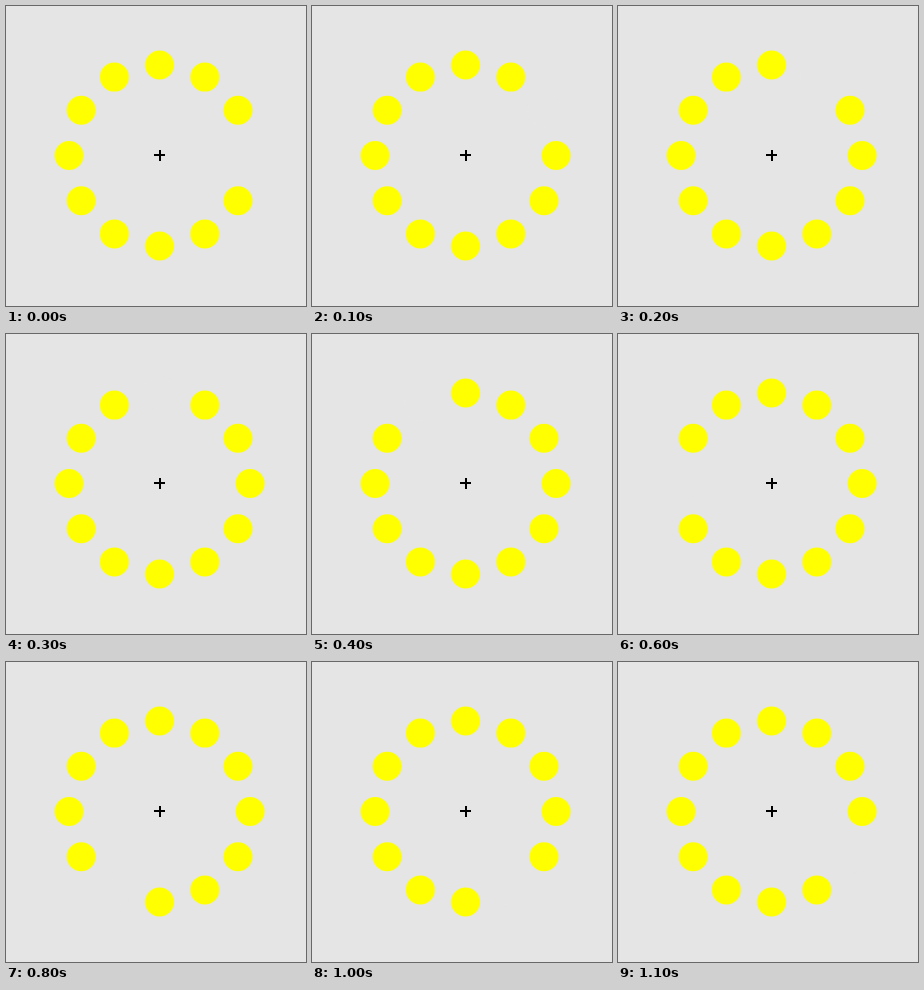
Recreate the animation shown at these times as an HTML page. Size 300 by 300 pixels, loop 1200 ms.

```html
<!DOCTYPE html>
<html lang="en">
<head>
<meta charset="utf-8">
<title>Ring of dots with a travelling gap</title>
<style>
  html, body { margin: 0; width: 100%; height: 100%; overflow: hidden; background: #e5e5e5; }
  svg { display: block; width: 300px; height: 300px; }
  #dots { fill: #ff0; }
  #gap {
    fill: #e5e5e5;
    transform-origin: 153.75px 149.5px;
    animation: travel 1200ms steps(12, end) infinite;
  }
  @keyframes travel {
    from { transform: rotate(0deg); }
    to { transform: rotate(-360deg); }
  }
</style>
</head>
<body>
<svg viewBox="0 0 300 300">
  <g id="dots"></g>
  <!-- background-coloured disc that hides one dot at a time -->
  <circle id="gap" cx="244.25" cy="149.5" r="17"/>
  <path d="M148 148h11v2h-11z M153 144h2v11h-2z"/>
</svg>
<script>
  const CENTER = { x: 153.75, y: 149.5 };
  const COUNT = 12, RING = 90.5, RADIUS = 14.5;
  const dots = document.getElementById('dots');

  for (let i = 0; i < COUNT; i++) {
    const angle = i * 2 * Math.PI / COUNT;
    const dot = document.createElementNS('http://www.w3.org/2000/svg', 'circle');
    dot.setAttribute('cx', CENTER.x + RING * Math.cos(angle));
    dot.setAttribute('cy', CENTER.y + RING * Math.sin(angle));
    dot.setAttribute('r', RADIUS);
    dots.append(dot);
  }
</script>
</body>
</html>
```
